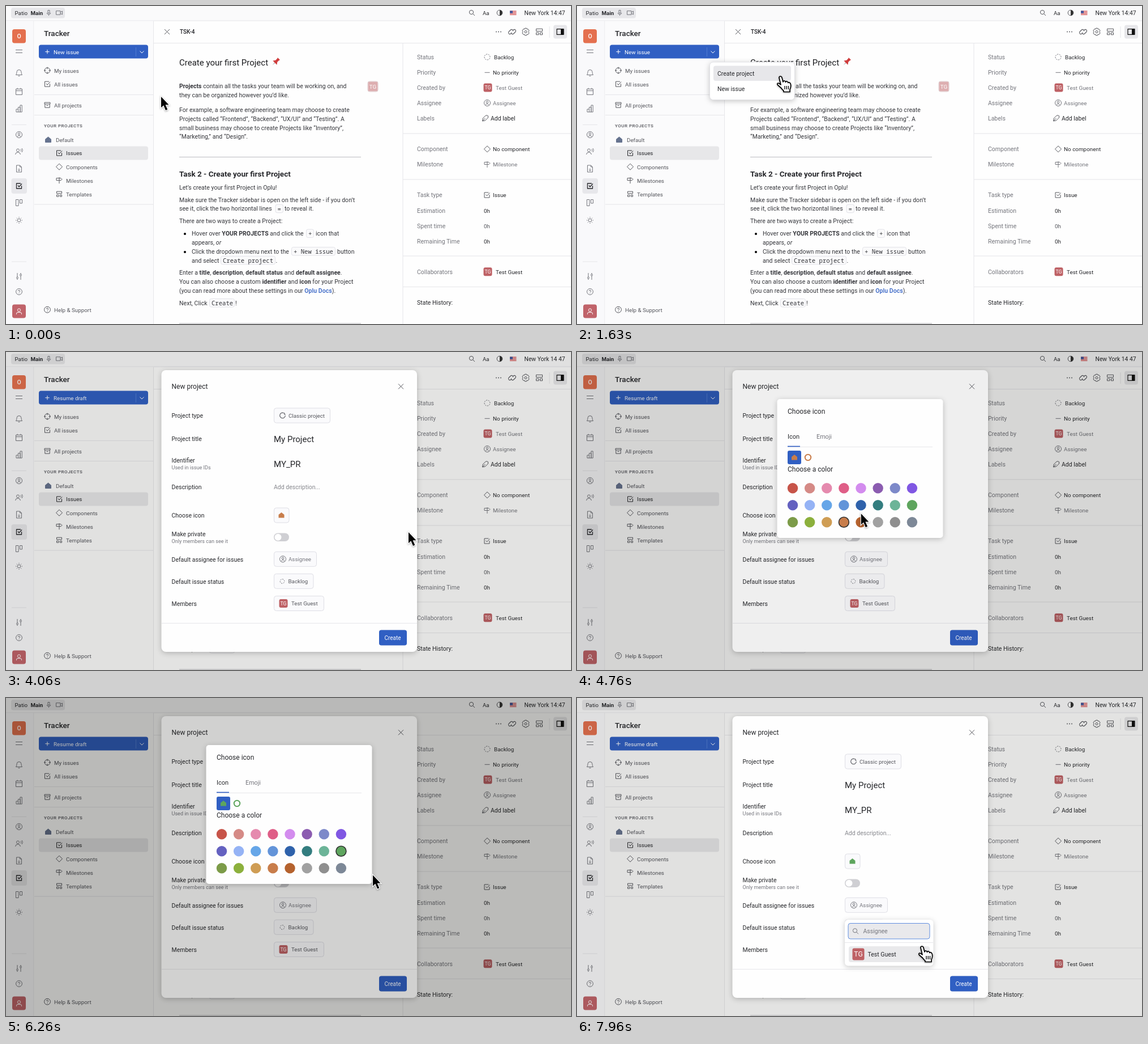
These frames come from a looping animation (998 by 561 pixels, 8 s). An HTML page:

```html
<!DOCTYPE html>
<html lang="en">
<head>
<meta charset="utf-8">
<title>Create a project</title>
<style>
  html, body { margin: 0; width: 100%; height: 100%; overflow: hidden; background: #fefefe; }
  svg { display: block; width: 998px; height: 561px; font-family: Roboto, sans-serif; }
  text { white-space: pre; }
  .body { letter-spacing: .04px; }
  .caps { letter-spacing: .5px; }
  .mono { font-family: "Noto Sans Mono", monospace; }
  .float { filter: drop-shadow(0 2px 5px rgba(0, 0, 0, .22)); }
  .pointer { filter: drop-shadow(0 1.5px 1.5px rgba(0, 0, 0, .35)); }
</style>
</head>
<body>
<svg id="stage" viewBox="0 0 998 561"></svg>
<script>
const INK = '#26272b', SOFT = '#55565c', GREY = '#75767d', LINE = '#e6e6ea', BLUE = '#305fc3', RED = '#be6165';
const MEMBER = 'Test Guest', INITIALS = 'TG';
const palette = ('c75449 d58a86 e58aae df5e87 d38cee 8b5cb0 7d89c9 8057e3 ' +
  '6461c0 95b3f5 66a6e8 6394d9 2f62ab 337d7f 6cb498 5ea55e ' +
  '7c9b48 8cb03c cf9d54 c87d4b b5622e a1a1a1 8f8f8f 7d8897').split(' ').map(c => '#' + c);
const swatch = i => [381 + i % 8 * 30.13, 240.3 + (i >> 3) * 30];

// Drawing helpers; text is placed by its left edge and the middle of its capitals
const text = (x, y, s, size = 10.5, fill = INK, weight = 400, attrs = '') =>
  `<text x="${x}" y="${y + size * .36}" font-size="${size}" fill="${fill}" font-weight="${weight}" ${attrs}>${s}</text>`;
const bold = s => `<tspan font-weight="700">${s}</tspan>`;
const rect = (x, y, w, h, r, fill, attrs = '') =>
  `<rect x="${x}" y="${y}" width="${w}" height="${h}" rx="${r}" fill="${fill}" ${attrs}/>`;
const box = (x, y, w, h, r = 4, fill = '#fafafc', stroke = '#dedee5') => rect(x, y, w, h, r, fill, `stroke="${stroke}"`);
const hline = (x1, x2, y, color = LINE) => rect(x1, y - .5, x2 - x1, 1, 0, color);
const icon = (x, y, d, color = SOFT, w = 1, attrs = '') =>
  `<path transform="translate(${x} ${y})" d="${d}" fill="none" stroke="${color}" stroke-width="${w}" stroke-linejoin="round" ${attrs}/>`;
const ring = (r, cx = 0, cy = 0) => `M${cx - r} ${cy}a${r} ${r} 0 1 0 ${2 * r} 0a${r} ${r} 0 1 0 ${-2 * r} 0`;
const group = (id, content, attrs = '') => `<g id="${id}" ${attrs}>${content}</g>`;
const badge = (x, y, s, opacity = 1) => `<g opacity="${opacity}">` + rect(x, y, s, s, 3, RED) +
  text(x + s / 2, y + s / 2, INITIALS, s * .58, '#fff', 400, 'text-anchor="middle"') + '</g>';
const body = (y, s, x = 306) => text(x, y, s, 10.5, '#34353a', 400, 'class="body"');
const chip = (x, y, w, s) => rect(x, y - 7.5, w, 14.5, 3, '#fafafb', 'stroke="#e2e2e8"') +
  text(x + 3.5, y, s, 10.6, '#34353a', 400, 'class="mono"');

const shape = {
  house: 'M-5 -1L0 -5 5 -1V4.5H-5Z',
  check: 'M3 -4.5H-4.5V4.5H4.5V-.5M-2 -1L0 1.5 5 -4',
  person: ring(5.5) + ring(1.8, 0, -1.5) + 'M-3.5 4Q0 -1 3.5 4',
  diamond: 'M0 -5.5L5.5 0 0 5.5 -5.5 0Z',
  sign: 'M0 -5.5V5.5M-5 -4H3L5 -2 3 0H-5Z',
  grid: 'M-4.5 -4.5H4.5V-1H-4.5ZM-4.5 1.5H-1V4.5H-4.5ZM1.5 1.5H4.5V4.5H1.5Z',
  lens: ring(3.6, -1, -1) + 'M1.7 1.7L5 5',
  close: 'M-4.5 -4.5L4.5 4.5M4.5 -4.5L-4.5 4.5',
  plus: 'M-3.7 0H3.7M0 -3.7V3.7',
  help: ring(5.4) + 'M-1.7 -1Q-1.5 -2.8 0 -2.8T1.6 -1Q1.6 0 0 .8M0 2.2V3.2',
  target: ring(4.8) + 'M0 -6V-2.5M0 6V2.5M-6 0H-2.5M6 0H2.5',
  box: 'M-5 -4.5H5V-1.8H-5ZM-4.2 -1.8V4.5H4.2V-1.8M-1.5 .8H1.5',
};
const dashed = 'stroke-dasharray="2.2 1.6"';

const topBar = rect(0, 0, 998, 26, 0, '#fafafb') + hline(0, 998, 26) +
  rect(9, 3, 95, 18.5, 4, '#e7e7ea') + text(15.5, 12.3, 'Patio', 9.75) + text(43.5, 12.3, 'Main', 9.75, INK, 700) +
  icon(75.5, 12, 'M-1.5 -4.5H1.5V.5H-1.5ZM-3.3 0Q-3 2.8 0 2.8T3.3 0M0 2.8V5', GREY) +
  icon(94, 12, 'M-5.5 -3.3H2V3.3H-5.5ZM2 -1L5.5 -3V3L2 1', GREY) +
  icon(823, 12, shape.lens, SOFT) + text(842, 12.3, 'Aa', 9.75) +
  icon(872, 12, ring(4.8)) + '<path d="M872 7.2a4.8 4.8 0 0 1 0 9.6z" fill="#333"/>' +
  rect(890, 8.5, 11.5, 7.5, 1, '#f2eeee') + [0, 1, 2, 3].map(i => rect(890, 8.5 + i * 2.1, 11.5, 1.1, 0, '#d4474b')).join('') +
  rect(890, 8.5, 5, 4.2, 0, '#41569c') +
  text(915.5, 12.3, 'New York 14<tspan id="colon">:</tspan>47', 10.35);

const rail = rect(0, 26.5, 49, 535, 0, '#f9f9fb') + rect(48.5, 26.5, 1, 535, 0, LINE) +
  rect(11, 41, 24, 24.5, 4, '#e4704f') + text(23, 53.5, 'O', 10.5, '#fff', 500, 'text-anchor="middle"') +
  icon(23, 80, 'M-6 -2.5H6M-6 2.5H6', GREY) +
  icon(23, 118, 'M-5.5 3.5Q-4 2 -4 -1.5Q-4 -5.5 0 -5.5T4 -1.5Q4 2 5.5 3.5ZM-1.5 5.5H1.5', GREY) +
  icon(23, 151, 'M-5.5 -4.5H5.5V5.5H-5.5ZM-5.5 -1.5H5.5M-3 -6.5V-4.5M3 -6.5V-4.5', GREY) +
  icon(23, 181, 'M-5 6V1H-1.5V6ZM-1.5 6V-2.5H2V6ZM2 6V-6H5.2V6Z', GREY) + hline(10, 36, 209.5) +
  icon(23, 227, shape.person, GREY) +
  icon(23, 257, ring(2.5, -2, -2.5) + 'M-6.5 5Q-6 1 -2 1T2.5 5M3 -4.5Q5 -2.5 3 -.5M5 -6Q8 -2.5 5 1', GREY) +
  icon(23, 287, 'M-4.5 -6H1.5L4.5 -3V6H-4.5ZM1.5 -6V-3H4.5M-2 1H2M-2 3.5H2', GREY) +
  rect(9.5, 304, 27.5, 27, 4, '#e7e7eb') + icon(23, 317.5, shape.check, INK, 1.3) +
  icon(23, 347, 'M-5.5 -5.5H-1V5.5H-5.5ZM1.5 -5.5H5.5V1H1.5Z', GREY) +
  icon(23, 378, ring(2.8) + 'M0 -6V-4.5M0 6V4.5M-6 0H-4.5M6 0H4.5M-4.2 -4.2L-3.2 -3.2M4.2 4.2L3.2 3.2M4.2 -4.2L3.2 -3.2M-4.2 4.2L-3.2 3.2', GREY) +
  hline(10, 36, 451) +
  icon(23, 477, 'M-3 -6V1M-3 4V6M3 -6V-4M3 -1V6' + ring(1.5, -3, 2.5) + ring(1.5, 3, -2.5), GREY) +
  icon(23, 504, shape.help, GREY) +
  rect(11, 526.5, 24, 24, 4, '#c0636a') + icon(23, 538.5, ring(2.6, 0, -2) + 'M-4.5 5.5V4Q-4.5 2 -2 2H2Q4.5 2 4.5 4V5.5', '#fff');

const navItem = (y, label, d, x = 73, dark = SOFT) => icon(x, y, d, dark) + text(x + 12, y + .3, label, 9.8, dark);
const nav = rect(49.5, 26.5, 211, 535, 0, '#fbfbfc') + rect(260, 26.5, 1, 535, 0, LINE) +
  text(67, 48, 'Tracker', 13.5, INK, 500) + rect(58, 68.5, 193, 24, 4, BLUE) + rect(229, 73, .7, 16, 0, '#5f87d8') +
  icon(73, 80.7, shape.plus, '#fff') + text(84, 81, '', 9.8, '#fff', 400, 'id="newIssue"') +
  icon(240, 81, 'M-3.5 -1.5L0 2 3.5 -1.5', '#fff') +
  navItem(113.7, 'My issues', shape.target) + navItem(137.7, 'All issues', shape.check) + hline(50, 260, 156.5) +
  navItem(174.7, 'All projects', shape.box) + hline(50, 260, 192.5) +
  text(67, 211.5, 'YOUR PROJECTS', 8, SOFT, 500, 'class="caps"') +
  icon(74.5, 236, shape.house, '#66738f', 1, 'style="fill:#66738f"') + text(88, 236, 'Default', 9.8, SOFT) +
  rect(58, 247.5, 193, 24, 4, '#e7e7e9') + navItem(259.5, 'Issues', shape.check, 94, INK) +
  navItem(283.7, 'Components', shape.diamond, 94) + navItem(307.7, 'Milestones', shape.sign, 94) +
  navItem(331.7, 'Templates', shape.grid, 94) + hline(50, 260, 350) + navItem(535.7, 'Help &amp; Support', shape.help);

const article = icon(284.5, 45.5, shape.close) + text(307, 45.7, 'TSK-4', 10, INK, 500) + hline(261, 998, 65.5) +
  [-4, 0, 4].map(d => `<circle cx="${870 + d}" cy="45.5" r=".9" fill="${SOFT}"/>`).join('') +
  icon(894, 45.5, 'M-1 2L-2.5 3.5A2.5 2.5 0 0 1 -6 0L-2.5 -3.5A2.5 2.5 0 0 1 1.5 -1M1 -2L2.5 -3.5A2.5 2.5 0 0 1 6 0L2.5 3.5A2.5 2.5 0 0 1 -1.5 1', SOFT, 1.1) +
  icon(918, 45.5, 'M-1.5 -6.3H1.5L2 -4.6 4 -5 6 -2 4.8 0 6 2.3 4 5 2 4.6 1.5 6.3H-1.5L-2 4.6 -4 5 -6 2.3 -4.8 0 -6 -2 -4 -5 -2 -4.6Z' + ring(2)) +
  icon(942, 45.5, 'M-5.5 -5.2H5.5V-1H-5.5ZM-5.5 1.5H-1V5.2H-5.5ZM1.5 1.5H5.5V5.2H1.5Z') + rect(959.5, 36, 1, 20, 0, LINE) +
  rect(967, 33.5, 24, 24, 4, '#e7e7ea') + icon(979, 45.5, 'M-6 -4.8H6V4.8H-6Z', '#111', 1.2) + rect(980, 41, 5, 9, 0, '#111') +
  text(306, 99.5, 'Create your first Project', 15, '#1c1d20') +
  '<g transform="translate(477 98) rotate(45)"><path d="M-.6 3H.6L0 9Z" fill="#8b9197"/><path d="M-3 -7H3L2.2 -5.5V-1L5 3H-5L-2.2 -1V-5.5Z" fill="#cf3c3c"/></g>' +
  badge(639.5, 133.5, 17, .5) + rect(639, 133, 18, 18, 3, 'none', 'stroke="#dcc8ca"') +
  body(141.3, bold('Projects') + ' contain all the tasks your team will be working on, and') +
  body(157, 'they can be organized however you’d like.') +
  ['For example, a software engineering team may choose to create',
   'Projects called “Frontend”, “Backend”, “UX/UI” and “Testing”. A',
   'small business may choose to create Projects like “Inventory”,',
   '“Marketing,” and “Design”.'].map((s, i) => body(183.3 + i * 15.75, s)).join('') +
  hline(306, 627, 266.5, '#bcbcc0') + text(306, 296.3, 'Task 2 - Create your first Project', 13.5, INK, 700) +
  body(320.3, 'Let’s create your first Project in Oplu!') +
  body(342, 'Make sure the Tracker sidebar is open on the left side - if you don’t') +
  body(357.7, 'see it, click the two horizontal lines') + chip(476, 357.7, 13.5, '=') + body(357.7, 'to reveal it.', 492) +
  body(379.7, 'There are two ways to create a Project:') +
  '<circle cx="316" cy="402" r="2"/><circle cx="316" cy="434" r="2"/>' +
  body(401.5, `Hover over ${bold('YOUR PROJECTS')} and click the`, 328) + chip(530.5, 401.5, 13, '+') + body(401.5, 'icon that', 547) +
  body(417.3, 'appears, <tspan font-style="italic">or</tspan>', 328) +
  body(433, 'Click the dropdown menu next to the', 328) + chip(504.5, 433, 77, '+ New issue') + body(433, 'button', 585) +
  body(448.8, 'and select', 328) + chip(379.5, 448.8, 96, 'Create project') + body(448.8, '.', 476.5) +
  body(470.5, `Enter a ${bold('title')}, ${bold('description')}, ${bold('default status')} and ${bold('default assignee')}.`) +
  body(486.3, `You can also choose a custom ${bold('identifier')} and ${bold('icon')} for your Project`) +
  body(502.2, `(you can read more about these settings in our <tspan fill="${BLUE}" font-weight="500">Oplu Docs</tspan>).`) +
  body(524, 'Next, Click') + chip(359.5, 524, 44, 'Create') + body(524, '!', 405) + hline(306, 627, 560, '#bcbcc0');

const field = (y, label, value, x = 860, color = INK, size = 9.9) => text(726, y, label, 10.5, GREY) + text(x, y, value, size, color);
const details = rect(700.5, 66, 1, 495, 0, LINE) + [225, 306, 441, 495.5].map(y => hline(701, 998, y)).join('') +
  field(90, 'Status', 'Backlog', 862) + icon(850, 90, ring(5), GREY, 1, dashed) +
  field(117.3, 'Priority', 'No priority') + hline(845.5, 854.5, 117.3, GREY) +
  field(144.3, 'Created by', MEMBER, 865, GREY) + badge(843.5, 136.5, 15) +
  field(171.3, 'Assignee', 'Assignee', 860, GREY) + icon(850, 171, shape.person, GREY) +
  field(198.3, 'Labels', 'Add label', 856, INK, 10.5) +
  icon(846.5, 198, 'M-5 5L-4 0 1 -5H4L5 -4V-1L0 4ZM-5 5L0 0') +
  field(252.5, 'Component', 'No component') + icon(850, 252.3, shape.diamond) +
  field(279.7, 'Milestone', 'Milestone', 860, GREY) + icon(850, 279.5, shape.sign, GREY) +
  field(333.7, 'Task type', 'Issue') + icon(849.5, 333.5, shape.check) +
  field(361, 'Estimation', '0h', 844) + field(388, 'Spent time', '0h', 844, SOFT) + field(415, 'Remaining Time', '0h', 844) +
  field(469, 'Collaborators', MEMBER, 865) + badge(843.5, 461.3, 15) + text(726, 523.3, 'State History:');

const menu = rect(234.5, 99, 150, 66.5, 6, '#fff', 'stroke="#e2e2e6"') + rect(241, 105.5, 137, 26.5, 4, '#e7e7ea') +
  text(248, 119.3, 'Create project') + text(248, 146.3, 'New issue');

const button = (y, w, label, x, color = SOFT) => box(473.5, y - 13, w, 26) + text(x, y + .2, label, 9.75, color);
const modal = rect(274.5, 32, 451.5, 497, 8, '#fefefe', 'class="float"') + text(292.5, 61, 'New project', 12) +
  icon(697.5, 60.8, shape.close) +
  [[112, 'Project type'], [153.7, 'Project title'], [191.3, 'Identifier'], [238, 'Description'], [288.7, 'Choose icon'],
   [321.3, 'Make private'], [366, 'Default assignee for issues'], [405, 'Default issue status'], [444, 'Members']]
    .map(([y, s]) => text(292.5, y, s)).join('') +
  text(292.5, 204, 'Used in issue IDs', 9.1, GREY) + text(292.5, 334, 'Only members can see it', 9.1, GREY) +
  button(112, 99, 'Classic project', 499) + icon(488.5, 112, 'M2 -4.4A4.8 4.8 0 1 0 4.8 0M3 -5V-2H5.5', SOFT, 1.1) +
  text(473, 153.7, '', 15, INK, 400, 'id="title"') + rect(496, 144, 1, 19, 0, '#111', 'id="caret"') +
  text(473, 197.5, '', 15, INK, 400, 'id="ident"') + text(473, 238, 'Add description...', 10.5, '#86878d') +
  box(473.5, 275, 26.5, 26) + `<path class="tint" transform="translate(486.5 288)" d="${shape.house}"/>` +
  rect(473, 319.5, 27, 14.5, 7.2, '#cfcfd3') + '<circle cx="480.5" cy="326.7" r="6" fill="#fff"/>' +
  button(365.3, 75, 'Assignee', 499, GREY) + icon(489, 365.3, shape.person, GREY) +
  button(404.3, 69.5, 'Backlog', 498.5) + icon(488, 404.5, ring(3.8), GREY, 1, dashed) +
  button(443.5, 88, MEMBER, 504) + badge(482.5, 436, 15) + hline(275, 726, 478.5) +
  rect(659, 490.5, 49, 27, 4, '#cfd2da') + rect(659, 490.5, 49, 27, 4, BLUE, 'id="enabled"') + text(668.5, 504.3, 'Create', 10, '#fff');

const picker = rect(353.5, 83, 293, 245, 5, '#fefefe', 'class="float"') + text(372, 104.3, 'Choose icon', 12) +
  text(372, 149, 'Icon', 11) + text(423, 149, 'Emoji', 10.8, GREY) + hline(372, 628, 167.5) + rect(372, 165.7, 22, 1.6, 0, BLUE) +
  rect(372, 174, 24, 24, 3, BLUE) + `<path class="tint" transform="translate(384 186)" d="${shape.house}"/>` +
  '<circle id="dot" cx="408" cy="186" r="5.2" fill="none" stroke-width="2"/>' + text(372, 206.7, 'Choose a color', 12) +
  palette.map((c, i) => `<circle cx="${swatch(i)[0]}" cy="${swatch(i)[1]}" r="9.2" fill="${c}"/>`).join('') +
  '<circle id="chosen" r="9" fill="none" stroke="#333" stroke-width="1.6"/>';

const people = rect(473, 391, 156.5, 81.5, 6, '#fff', 'class="float"') + box(479, 397.5, 144, 27.5, 4, '#e9e9ec', '#5f8de0') +
  icon(492, 411.3, shape.lens, GREY) + text(505.5, 411.7, 'Assignee', 10.5, GREY) + hline(473, 629, 431.5) +
  rect(480, 438, 143, 28, 4, '#e9e9eb') + badge(486.5, 441.5, 21) + text(513.5, 452.3, MEMBER);

const pointer = group('arrow', '<path d="M0 0V19.2L4.3 15.2 8 24 11.3 22.6 7.6 14.2H13.5Z" fill="#000" stroke="#fff" stroke-width="2.4" paint-order="stroke"/>') +
  group('hand', '<path d="M-2 2.5Q-1.8 0 .3 0 2.3 0 3 2.5L5 10Q5.5 7.7 7.3 8 9 8.2 9.4 10.3 10.2 8.5 12 9 13.5 9.5 13.8 11.5 15 10 16.6 11.2 18.8 13 18.7 17 18.7 20 17 23.5V27.5H6V25.5Q3.5 23.5 1.5 20.5L-4.3 15.5Q-6 13 -4.3 12.3 -2.5 11.6 1 15Z" fill="#fff" stroke="#000" stroke-width="1.7" stroke-linejoin="round"/>' +
    '<path d="M8 17V23M11.3 17V23M14.5 17V23" stroke="#000" stroke-width="1.3"/>');

const $ = id => document.getElementById(id);
$('stage').innerHTML = rect(0, 0, 998, 561, 0, '#fefefe') + topBar + rail + nav + article + details +
  group('menu', menu, 'class="float"') + rect(0, 0, 998, 561, 0, '#0a0a00', 'id="shade" opacity=".11"') +
  group('modal', modal) + rect(0, 0, 998, 561, 0, '#0a0a00', 'id="pickerShade"') + group('picker', picker) +
  group('people', people) + group('cursor', pointer, 'class="pointer"');

// Timeline in ms
const LOOP = 8000, MODAL = 1800, PICKER = 4640, PICK = 5660, PICKER_END = 6700, PEOPLE = 7330;
const name = 'My Project', keys = [2400, 2570, 2800, 2960, 3160, 3300, 3440, 3580, 3720, 3860];
const blinks = [340, 770, 1200, 1630, 1800, 2060, 2490, 2960, 3350, 3780, 4060, 4210, 4640, 5060, 5500, 5930, 6360, 6700, 7130, 7560];
// start, end, x, y at the end, hand at the end
const moves = [
  [0, 0, 274, 160, 0], [30, 360, 240, 78, 1], [640, 1460, 359, 124, 1], [MODAL, MODAL, 694, 298, 0],
  [3700, 4060, 711, 318, 0], [4130, 4540, 487, 285, 1], [4680, 4930, 547, 286, 0],
  [5200, 5600, 592, 266, 1], [5930, 6400, 663, 325, 0], [6700, 7160, 512, 362, 1], [7400, 7960, 609, 438, 1]];

const ramp = (t, a, b) => b > a ? Math.min(1, Math.max(0, (t - a) / (b - a))) : +(t >= a);
const passed = (list, t) => list.filter(v => t >= v).length;
const show = (id, on) => $(id).setAttribute('visibility', on ? 'visible' : 'hidden');
const set = (id, attrs) => Object.entries(attrs).forEach(([k, v]) => $(id).setAttribute(k, v));

function placeCursor(t) {
  const i = moves.findLastIndex(m => t >= m[0]), to = moves[i], from = moves[i - 1] || to;
  const p = ramp(t, to[0], to[1]), e = p * p * (3 - 2 * p);
  const x = from[2] + (to[2] - from[2]) * e, y = from[3] + (to[3] - from[3]) * e;
  const hand = p < .2 ? from[4] : p > .75 && to[4];
  set('cursor', { transform: `translate(${x} ${y})` });
  show('arrow', !hand);
  show('hand', hand);
}

function draw(t) {
  const open = t >= MODAL, picking = t >= PICKER && t < PICKER_END;
  const typed = name.slice(0, passed(keys, t)), count = typed.length;
  show('menu', t >= 580 && !open);
  show('shade', open);
  show('modal', open);
  show('picker', picking);
  show('people', t >= PEOPLE);
  show('colon', passed(blinks, t) % 2 === 0);
  set('pickerShade', { opacity: picking ? .18 * ramp(t, PICKER, 5000) : 0 });
  $('newIssue').textContent = open ? 'Resume draft' : 'New issue';

  $('title').textContent = typed || 'New project';
  $('ident').textContent = typed.toUpperCase().replace(' ', '_').slice(0, 5) || 'PRJCT';
  for (const id of ['title', 'ident']) set(id, { fill: count ? INK : '#9b9ca2' });
  set('caret', { x: count ? 473 + $('title').getComputedTextLength() - .5 : 473 });
  show('caret', open && (t < 2060 || t >= keys[0] && t < 3960));
  set('enabled', { opacity: ramp(t, 2400, 2560) });

  // The suggested colour follows the length of the title until one is picked
  const pick = t < PICK ? 17 * (count + 1) % 24 : 15, [cx, cy] = swatch(pick);
  document.querySelectorAll('.tint').forEach(el => el.setAttribute('fill', palette[pick]));
  set('dot', { stroke: palette[pick] });
  set('chosen', { cx, cy });
  placeCursor(t);
}

function frame() {
  draw(performance.now() % LOOP);
  requestAnimationFrame(frame);
}
frame();
</script>
</body>
</html>
```
